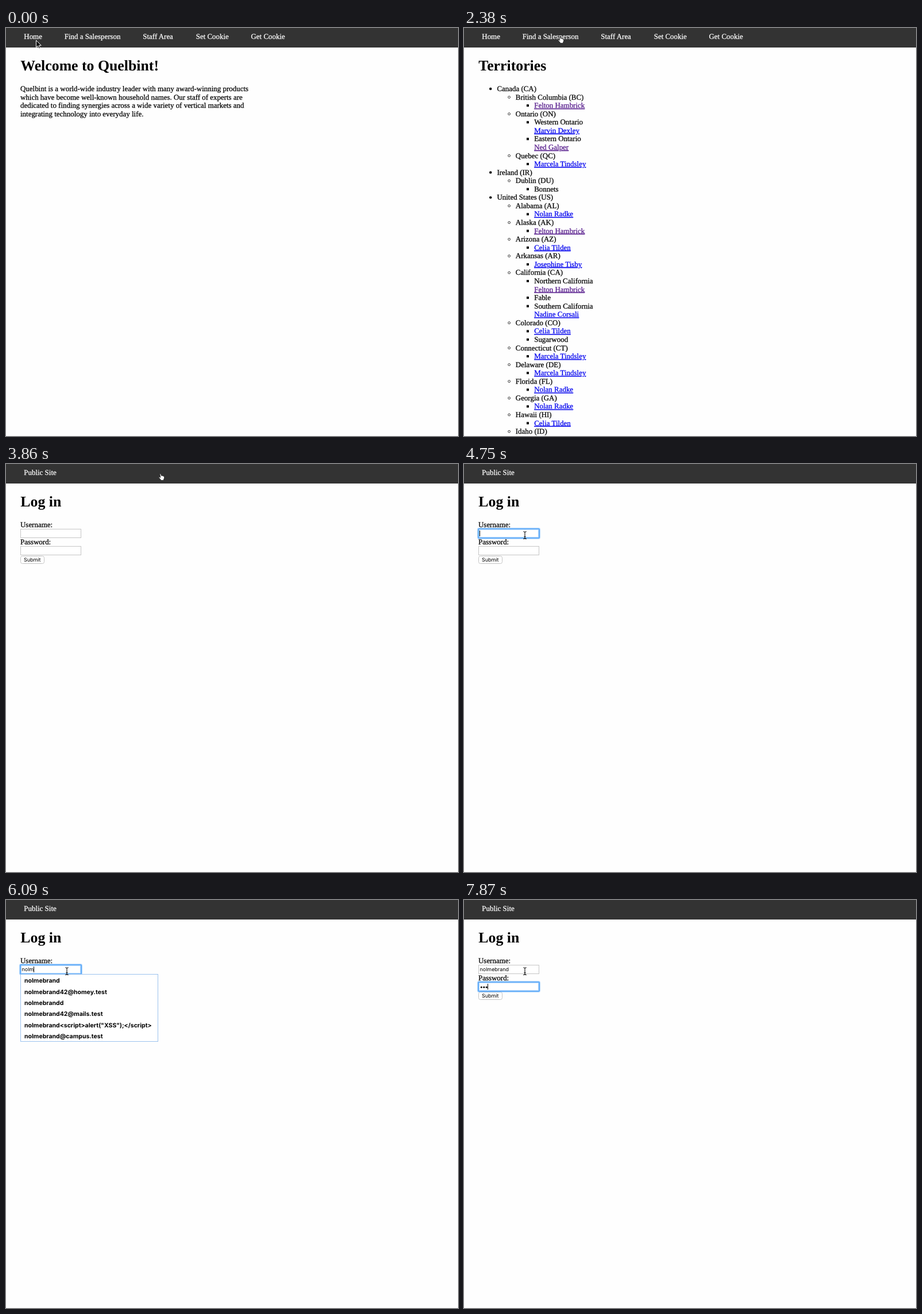
These frames come from a looping animation (787 px wide and 711 px high, 8000 ms). An HTML page:

```html
<!DOCTYPE html>
<html lang="en">
<head>
<meta charset="utf-8">
<title>Site login</title>
<style>
  html, body { margin: 0; width: 100%; height: 100%; overflow: hidden; background: #fefefe; }
  svg { display: block; text-rendering: geometricPrecision; }
  text { font: 12.95px "Liberation Serif", "Times New Roman", serif; white-space: pre;
    fill: #000; stroke: #000; stroke-width: .25; }
  .nav { fill: #fff; stroke: #fff; }
  .title { font-size: 25.8px; font-weight: bold; stroke: none; }
  .link { fill: #00e; stroke: #00e; text-decoration: underline; }
  .seen { fill: #551a8b; stroke: #551a8b; }
  .ui { font: 8.95px Inter, sans-serif; stroke: none; }
  .option { font: bold 10.5px Inter, sans-serif; stroke: none; }
  .field { fill: #fff; stroke: #c6c6c6; }
  .ring { fill: none; stroke: #62acf8; stroke-width: 2.2; }
  .glow { fill: none; stroke: #62acf8; stroke-width: 4.4; opacity: .35; }
</style>
</head>
<body>
<svg id="stage" width="787" height="711" viewBox="0 0 787 711">
  <rect width="787" height="34" fill="#333"/>
  <g id="home"></g>
  <g id="areas"></g>
  <g id="login">
    <rect class="field" x="25.5" y="113.5" width="105" height="15"/>
    <rect class="field" x="25.5" y="143.5" width="105" height="15"/>
    <rect x="25.5" y="160.5" width="41" height="13" rx="3" fill="#fff" stroke="#c4c4c4"/>
    <g id="focus">
      <rect class="glow" x="25" y="113" width="106" height="16" rx="1.5"/>
      <rect class="ring" x="25" y="113" width="106" height="16" rx="1"/>
    </g>
    <text id="user" class="ui" x="27.5" y="124.3"></text>
    <g id="dots">
      <circle cx="30.3" cy="152" r="1.6"/>
      <circle cx="34.8" cy="152" r="1.6"/>
      <circle cx="39.2" cy="152" r="1.6"/>
    </g>
    <rect id="caret" width="1" height="10"/>
    <g id="options">
      <rect x="25.5" y="129.5" width="239" height="117" fill="#fff" stroke="#9cc3ee"/>
    </g>
  </g>
  <g id="cursor">
    <path id="arrow" d="M0 0V12.2L2.8 9.6 4.8 14.2 6.9 13.3 4.9 8.8H8.7Z" stroke="#fff"/>
    <path id="hand" fill="#fff" stroke="#222" stroke-width=".8" stroke-linejoin="round"
      d="M2.5 1.5q1-1 1.8 0l1 3.1.6-.4q.8-.2 1.1.5l.7-.1q.8 0 1 .7 1.3-.1 1.5 1.2l.1 2.2-1.2 2.6v1.2H4.5l-.4-1.2L.9 7.7Q.6 6.5 1.8 6.6l1.8 1Z"/>
    <path id="beam" fill="none" stroke="#111" stroke-width="1.1"
      d="M-2.8-6.3Q0-6.3 0-4.5 0-6.3 2.8-6.3M0-4.8V4.8M-2.8 6.5Q0 6.5 0 4.5 0 6.5 2.8 6.5M-1.5 2.5h3"/>
  </g>
</svg>
<script>
const LOOP = 8000, LINE = 14.565;
const $ = id => document.getElementById(id);

function add(parent, tag, attrs, text) {
  const node = document.createElementNS("http://www.w3.org/2000/svg", tag);
  for (const key in attrs) node.setAttribute(key, attrs[key]);
  if (text) node.textContent = text;
  $(parent).append(node);
}
const write = (parent, text, x, y, cls = "") => add(parent, "text", { x, y, class: cls }, text);
const show = (id, on) => $(id).setAttribute("visibility", on ? "inherit" : "hidden");

// Navigation and titles
const menu = [["Home", 31.3], ["Find a Salesperson", 101.7], ["Staff Area", 238.3],
  ["Set Cookie", 330.7], ["Get Cookie", 426.5]];
for (const page of ["home", "areas"])
  for (const [label, x] of menu) write(page, label, x, 19.1, "nav");
write("login", "Public Site", 31.3, 19.1, "nav");
write("home", "Welcome to Quelbint!", 25.3, 74, "title");
write("areas", "Territories", 25.3, 74, "title");
write("login", "Log in", 25.3, 74, "title");

[
  "Quelbint is a world-wide industry leader with many award-winning products",
  "which have become well-known household names. Our staff of experts are",
  "dedicated to finding synergies across a wide variety of vertical markets and",
  "integrating technology into everyday life."
].forEach((line, i) => write("home", line, 25, 110 + i * LINE));

// "-" marks depth, "@" a link, "*" a visited link, "=" a line without bullet
const people = { F: "*Felton Hambrick", M: "@Marvin Dexley", N: "*Ned Galper", T: "@Marcela Tindsley",
  R: "@Nolan Radke", C: "@Celia Tilden", J: "@Josephine Tisby", S: "@Nadine Corsali" };
const tree = `Canada (CA)
-British Columbia (BC)
--F
-Ontario (ON)
--Western Ontario
--=M
--Eastern Ontario
--=N
-Quebec (QC)
--T
Ireland (IR)
-Dublin (DU)
--Bonnets
United States (US)
-Alabama (AL)
--R
-Alaska (AK)
--F
-Arizona (AZ)
--C
-Arkansas (AR)
--J
-California (CA)
--Northern California
--=F
--Fable
--Southern California
--=S
-Colorado (CO)
--C
--Sugarwood
-Connecticut (CT)
--T
-Delaware (DE)
--T
-Florida (FL)
--R
-Georgia (GA)
--R
-Hawaii (HI)
--C
-Idaho (ID)`;
tree.split("\n").forEach((row, i) => {
  const [, dashes, bare, label] = row.match(/^(-*)(=?)(.*)$/);
  const depth = dashes.length, x = 57.4 + depth * 32.4, y = 110 + i * LINE;
  const name = people[label] || label;
  const cls = name[0] === "@" ? "link" : name[0] === "*" ? "link seen" : "";
  write("areas", name.replace(/^[@*]/, ""), x, y, cls);
  if (bare) return;
  if (depth === 2) add("areas", "rect", { x: x - 13.2, y: y - 6, width: 4, height: 4 });
  else add("areas", "circle", { cx: x - 11.2, cy: y - 4, r: depth ? 1.9 : 2.2,
    fill: depth ? "none" : "#000", stroke: depth ? "#000" : "none", "stroke-width": .8 });
});

// Login form
const user = "nolmebrand";
write("login", "Username:", 25, 110);
write("login", "Password:", 25, 140);
write("login", "Submit", 31, 170.2, "ui");
["", "42@homey.test", "d", "42@mails.test", '<script>alert("XSS");<\/script>', "@campus.test"]
  .forEach((tail, i) => write("options", user + tail, 32, 144.2 + i * 19.4, "option"));
$("login").append($("options"));

// Stepped timelines: [start, value...]
const pages = [[0, "home"], [2380, "areas"], [3860, "login"]];
const pointer = [
  [0, "arrow", 52.5, 21.5], [150, "hand", 51, 18], [300, "hand", 50.5, 16], [450, "hand", 50.5, 15],
  [1200, "hand", 58, 16], [1350, "arrow", 78, 17], [1500, "hand", 105, 16], [1640, "hand", 135, 14.5],
  [1780, "hand", 155, 14], [1930, "hand", 163.3, 14], [2530, "hand", 176, 14.5], [2680, "arrow", 212, 17],
  [2820, "hand", 245, 17], [2970, "hand", 265.3, 16.5], [3860, "hand", 265.3, 16],
  [4310, "arrow", 258, 30], [4460, "arrow", 195, 80], [4600, "beam", 118, 118], [4750, "beam", 106, 124]
];
const typed = [[0, 0], [5800, 2], [5940, 3], [6090, 4], [6240, 6], [6390, 8], [6530, 9], [6680, 10]];
const secret = [[0, 0], [7570, 1], [7720, 2], [7870, 3]];
const blink = [[0, false], [4750, true], [5350, false], [5800, true], [7280, false], [7570, true]];
const at = (steps, t) => steps.filter(step => step[0] <= t).pop().slice(1);

function draw(t) {
  const [page] = at(pages, t), [kind, x, y] = at(pointer, t);
  for (const id of ["home", "areas", "login"]) show(id, id === page);
  for (const id of ["arrow", "hand", "beam"]) show(id, id === kind);
  $("cursor").setAttribute("transform", `translate(${x} ${y})`);

  const [letters] = at(typed, t), [count] = at(secret, t), second = t >= 6830;
  $("user").textContent = user.slice(0, letters);
  [...$("dots").children].forEach((dot, i) =>
    dot.setAttribute("visibility", i < count ? "inherit" : "hidden"));
  show("focus", t >= 4750);
  $("focus").setAttribute("transform", `translate(0 ${second ? 30 : 0})`);
  show("options", t >= 5800 && !second);

  const width = second ? count * 4.6 : letters ? $("user").getComputedTextLength() : 0;
  $("caret").setAttribute("x", Math.round(27 + width));
  $("caret").setAttribute("y", second ? 146 : 116);
  show("caret", at(blink, t)[0]);
}

const start = performance.now();
function tick() {
  draw((performance.now() - start) % LOOP);
  requestAnimationFrame(tick);
}
tick();
</script>
</body>
</html>
```
